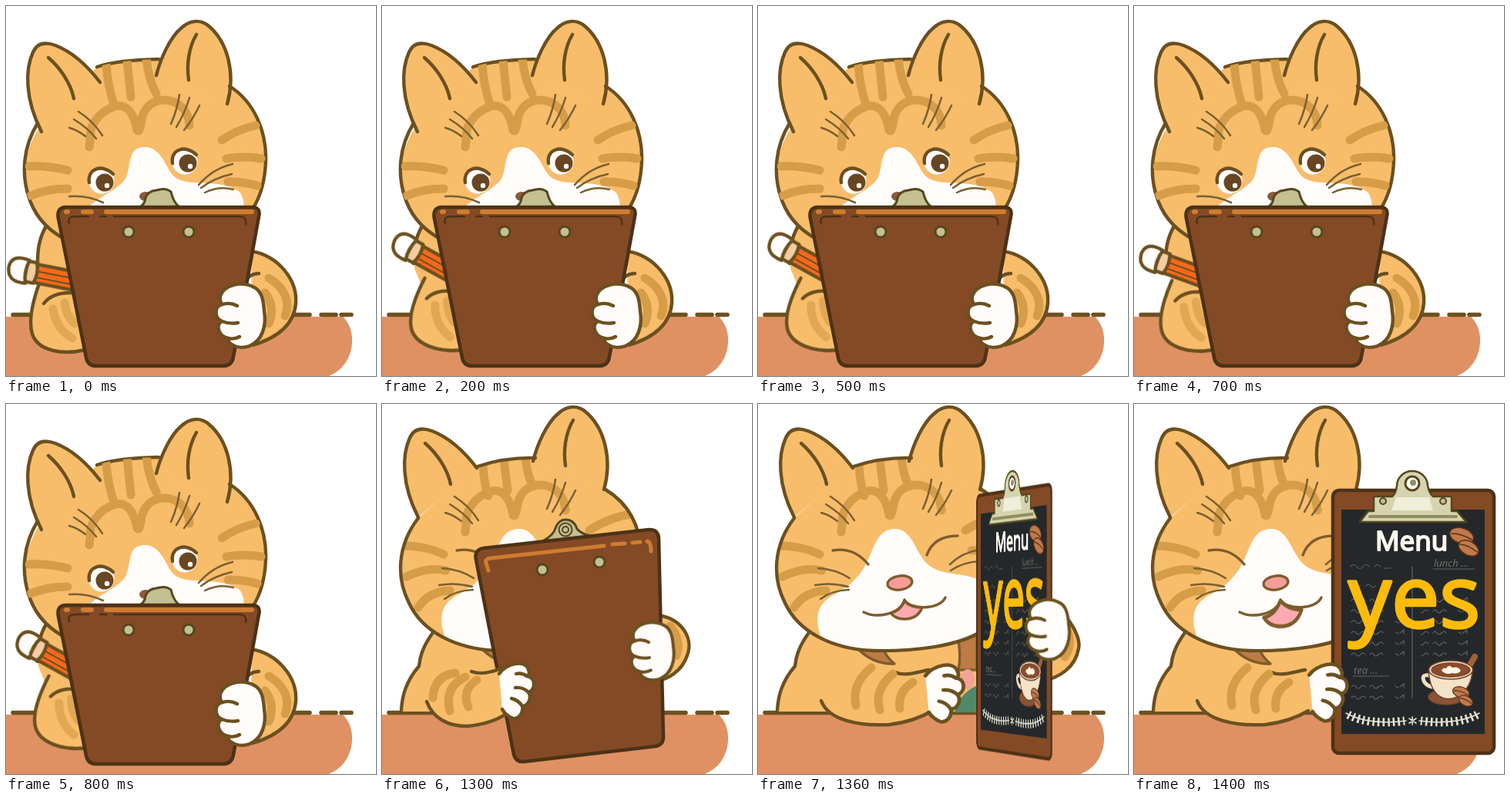
Animation, 480 px wide and 480 px high, one loop 1.42 s. Source, as an HTML page:

```html
<!DOCTYPE html>
<html lang="en">
<head>
<meta charset="utf-8">
<title>Cat with a menu board</title>
<style>
  html, body { margin: 0; width: 100%; height: 100%; overflow: hidden; background: #fff; }
  #stage { position: relative; width: 480px; height: 480px; overflow: hidden; }
  #stage > svg { position: absolute; left: 0; top: 0; width: 480px; height: 480px; }
  svg { fill: none; stroke-linecap: round; stroke-linejoin: round; }

  .ink { stroke: #6b5020; stroke-width: 4.4; }
  .fur { fill: #f8bd6b; }
  .white { fill: #fffcfa; }
  .stripe { stroke: #d69d49; stroke-width: 11; }
  .hair { stroke: #7a6032; stroke-width: 2.5; }
  .face { stroke: #7d5c2c; stroke-width: 3.4; }
  .wood { fill: #844a25; stroke: #4c3216; stroke-width: 4.5; }
  .shine { stroke: #ce7c31; stroke-width: 5; }
  .metal { fill: #c3c092; stroke: #55461f; stroke-width: 3; }
  .bean { fill: #c17a4a; stroke: #55301c; stroke-width: 1.6; }
  .chalk { stroke: #62625d; stroke-width: 1.2; }
  text { font-family: "Open Sans", sans-serif; }

  .t { animation: 1420ms step-end infinite; }
  .write { animation-name: write; }
  .smile { animation-name: smile; }
  .hold { animation-name: hold; }
  .turn { animation-name: turn; }
  .reach { animation-name: reach; }
  .grip { animation-name: grip; }
  .pencil { animation-name: pencil; }
  .forearm { animation-name: forearm; transform-origin: 100px 446px; }
  .back { animation-name: back; }
  .tongue { animation-name: tongue; transform-origin: 190px 258px; }
  .paw { animation-name: paw; }
  #front { animation-name: front; transform-origin: 362px 282px; }

  @keyframes write { 0% { opacity: 1 } 91.54%, 100% { opacity: 0 } }
  @keyframes smile { 0% { opacity: 0 } 91.54%, 100% { opacity: 1 } }
  @keyframes hold { 0%, 92.95%, 100% { opacity: 0 } 91.54% { opacity: 1 } }
  @keyframes turn { 0%, 94.36%, 100% { opacity: 0 } 91.54% { opacity: 1 } }
  @keyframes reach { 0% { opacity: 0 } 92.95%, 100% { opacity: 1 } }
  @keyframes grip { 0%, 98.59%, 100% { opacity: 0 } 92.95% { opacity: 1 } }

  @keyframes pencil {
    0%, 21.12%, 42.25% { transform: translate(18px, 343px) rotate(11deg) }
    7.04%, 28.16%, 49.29% { transform: translate(23px, 328px) rotate(20deg) }
    14.08%, 35.21%, 56.33%, 100% { transform: translate(29px, 312px) rotate(29deg) }
  }
  @keyframes forearm {
    0%, 21.12%, 42.25% { transform: none }
    7.04%, 28.16%, 49.29% { transform: rotate(4deg) }
    14.08%, 35.21%, 56.33%, 100% { transform: rotate(8deg) }
  }
  @keyframes back {
    0% { transform: none }
    92.95%, 100% { transform: translate(184px, 0) scaleX(.5) }
  }
  @keyframes tongue { 0% { transform: none } 98.59%, 100% { transform: scale(1.2, 1.45) } }
  @keyframes paw {
    0% { transform: translate(50px, -8px) scale(1.1, 1.03) }
    98.59%, 100% { transform: translate(60px, -9px) scale(1.1, 1.03) }
  }
  @keyframes front {
    0% { opacity: 0; transform: none }
    94.36% { opacity: 1; transform: translateX(-36px) perspective(2100px) rotateY(-81deg) }
    95.77% { opacity: 1; transform: translateX(-32px) perspective(2100px) rotateY(-62.6deg) }
    97.18% { opacity: 1; transform: translateX(-16px) perspective(2100px) rotateY(-35deg) }
    98.59%, 100% { opacity: 1; transform: none }
  }
</style>
</head>
<body>
<div id="stage">

<!-- table, cat and back of the board -->
<svg viewBox="0 0 480 480">
  <defs>
    <g id="ears" class="fur ink">
      <path d="M46 163C24 120 25 82 35 60C41 46 53 47 64 51C87 60 106 78 122 99"/>
      <path d="M195 90C200 70 212 41 228 28C239 18 253 17 263 26C288 47 298 88 287 127"/>
      <path fill="none" d="M55 67C70 80 84 100 88 120M247 37C237 54 234 76 237 96"/>
    </g>
    <g id="brow">
      <path class="stripe" d="M108 183C111 166 107 162 115 150C122 139 132 133 142 130C157 127 166 139 170 161C173 164 173 160 175 153C177 131 191 121 208 122C226 124 237 137 238 155"/>
      <path class="hair" d="M94 137Q113 149 125 168M88 147Q106 158 117 172M82 158Q93 161 103 169M225 115Q222 135 214 153M238 119Q232 139 221 157M251 129Q243 146 231 161"/>
    </g>
    <g id="pawLeft">
      <path class="white ink" d="M322 365C305 356 283 362 278 376C277 382 279 386 281 387C271 388 269 404 280 409C272 414 275 428 288 431C288 440 303 446 316 441C333 434 338 414 335 396C334 382 332 370 322 365Z"/>
      <path class="ink" d="M281 387Q291 384 300 389M280 409Q290 413 301 411M288 431Q296 433 303 429"/>
    </g>
    <g id="pawRight">
      <path class="white ink" d="M152 350C160 337 186 330 190 345C192 349 190 352 188 353C199 354 200 370 190 374C195 382 189 392 182 392C184 402 176 409 170 408C163 405 159 402 156 396"/>
      <path class="ink" d="M188 353Q181 348 174 350M190 374Q183 367 173 368M182 392Q177 384 168 382"/>
    </g>
    <clipPath id="headUp"><path id="writeShape" d="M45 155L118 79Q145 70 198 69L290 104C323 125 338 164 337 200Q336 238 318 270L75 303C45 288 23 258 24 215Q26 182 45 155Z"/></clipPath>
    <clipPath id="headSmile"><path id="smileShape" d="M47 148C20 183 18 225 35 258C52 295 95 318 150 320C205 321 258 314 288 296C330 280 337 230 336 195C335 155 318 128 290 111L199 71Q160 68 124 80Z"/></clipPath>
  </defs>

  <path fill="#e09163" d="M0 403H437Q450 416 449 437C447 460 435 473 419 480H0Z"/>
  <path class="ink" style="stroke-width:5.5" d="M9 400.500H394M409 400.500H428M435 400.500H448"/>

  <!-- writing pose -->
  <g class="t write">
    <path class="fur" d="M52 280C41 300 41 320 42 340L58 380V430H110V280Z"/>
    <path class="ink" d="M53 284C42 302 41 318 41 334"/>
    <path class="fur ink" d="M318 318C354 324 378 356 376 385C374 414 350 431 320 440"/>
    <path class="stripe" d="M341 353C360 364 370 383 362 402M336 372Q350 390 341 412"/>
    <path class="ink" d="M328 347Q315 347 308 360"/>

    <use href="#writeShape" class="fur"/>
    <use href="#ears"/>
    <path class="ink" d="M118 79Q145 70 198 69M290 104C323 125 338 164 337 200Q336 238 320 263M41 152C22 183 20 217 29 246C36 270 50 287 72 300"/>
    <g clip-path="url(#headUp)">
      <path class="stripe" d="M130 76Q132 104 140 127M157 70L162 118M182 68Q185 96 195 114M30 208Q53 207 80 213M32 246Q53 237 80 237M280 174Q298 161 324 155M286 198Q310 194 331 198M288 228Q310 228 326 233"/>
    </g>
    <use href="#brow"/>
    <path class="white" d="M104 264C121 246 149 237 156 222C163 203 158 183 180 183C203 183 207 212 219 222C236 236 279 222 304 242Q310 252 308 264Z"/>
    <path class="hair" d="M82 247Q105 245 126 255M294 205Q268 211 250 232M293 218Q270 223 253 236M295 238Q276 233 258 242"/>
    <g id="eye">
      <circle class="white" cx="124" cy="227" r="16.500"/>
      <path class="ink" d="M108 229C105 211 125 204 139 218"/>
      <circle cx="128" cy="229" r="11.500" fill="#684621"/>
      <circle cx="131" cy="233" r="3.200" fill="#fff"/>
    </g>
    <use href="#eye" x="108" y="-25"/>
    <ellipse cx="181" cy="247" rx="8" ry="6" fill="#8c5a3b"/>

    <g class="t forearm">
      <path class="fur" d="M44 358C31 394 30 412 34 425C41 448 74 453 103 446V345Z"/>
      <path class="ink" d="M43 360C31 394 30 412 34 425C41 448 74 453 103 446M49 386Q60 371 87 372"/>
      <path class="stripe" opacity=".65" d="M61 393Q65 419 86 431M76 385Q78 402 89 412"/>
    </g>
    <g class="t pencil">
      <path fill="#f86919" class="ink" d="M20-12H85V12H20Z"/>
      <path class="ink" style="stroke-width:2" d="M25-3H80M25 5H80"/>
      <path fill="#f3cda0" class="ink" d="M8-14H20Q25 0 20 13H8Z"/>
      <path class="white ink" d="M10-15Q-14-20-15-2Q-14 18 10 15Q5 0 10-15Z"/>
    </g>

    <path class="metal" d="M172 262Q180 258 181 249Q184 240 195 239Q207 235 214 241Q217 254 224 260Z"/>
    <path class="wood" d="M78 261H319Q331 261 328 273L295 455Q293 467 281 467H117Q106 467 104 456L68 276Q65 261 78 261Z"/>
    <path class="shine" style="stroke-width:6" d="M78 267H80M100 267H111M130 267H319"/>
    <path stroke="#4c3216" stroke-width="2.500" d="M82 282Q79 273 90 273H107M122 273H130M140 273H302Q313 273 311 283"/>
    <circle class="metal" cx="159" cy="293" r="7"/>
    <circle class="metal" cx="237" cy="293" r="7"/>
    <use href="#pawLeft"/>
  </g>

  <!-- smiling pose -->
  <g class="t smile">
    <path class="fur" d="M66 295C50 318 49 333 47 341C30 361 26 380 25 399H286V290Z"/>
    <path class="ink" d="M65 298C50 319 49 333 48 340C30 361 26 380 25 398"/>
    <path fill="#bd7b46" class="face" d="M130 318Q150 338 177 337Q167 329 164 320Z"/>
    <path fill="#bd7b46" class="face" d="M259 303Q264 325 260 345H284V300Z"/>
    <path fill="#50896a" d="M255 400Q260 376 286 364V400Z"/>
    <use href="#smileShape" class="fur"/>
    <use href="#ears" x="1" y="-16"/>
    <g clip-path="url(#headSmile)">
      <path class="stripe" d="M131 78Q132 103 138 119M158 72L163 112M186 70Q188 91 196 107M32 184Q59 185 80 195M32 224Q58 211 83 216M47 264Q61 243 88 242M269 164Q294 147 327 142M277 190H335"/>
      <path class="white" d="M78 272C83 247 112 246 127 226C151 204 147 162 178 162C200 162 204 192 219 207C237 224 265 217 292 230V330H100Q73 300 78 272Z"/>
    </g>
    <use href="#brow" y="-17"/>
    <path class="ink" d="M47 148C20 183 18 225 35 258C52 295 95 318 150 320C205 321 258 314 288 296C330 280 337 230 336 195C335 155 318 128 290 111M124 81Q160 69 199 70"/>
    <path class="hair" d="M78 213Q100 214 119 226M74 235Q95 231 117 237M81 253Q95 242 118 241M249 208Q264 193 287 189M250 216Q266 205 288 204"/>
    <path class="face" d="M97 190Q124 185 143 208M219 196Q228 171 259 171"/>
    <ellipse class="face" cx="184" cy="232" rx="16" ry="9" fill="#f49d98" transform="rotate(-8 184 232)"/>
    <path class="t tongue face" fill="#fbaab0" d="M172 271Q184 269 190 256Q198 264 213 264Q207 279 190 279Q178 279 172 271Z"/>
    <path class="face" d="M137 270C153 278 184 274 190 254C198 268 236 267 243 251"/>

    <g class="t reach">
      <path class="fur" d="M82 385C91 410 130 418 170 416Q203 412 226 398L222 345L150 342Z"/>
      <path class="ink" d="M82 385C91 410 130 418 170 416Q203 412 226 398M178 348C191 354 208 347 222 345"/>
      <path class="stripe" d="M147 342Q121 363 127 391M175 350Q150 371 158 397M201 361Q181 373 184 395"/>
      <ellipse class="t grip" cx="272" cy="357" rx="9" ry="13" fill="#f3a19a"/>
    </g>
    <g class="t hold">
      <path class="fur ink" d="M355 274C387 276 405 303 396 326C389 347 371 357 355 360"/>
      <path class="stripe" d="M374 288Q389 307 382 326"/>
    </g>
    <g class="t grip">
      <path class="fur ink" d="M370 257C397 263 420 300 416 317C411 344 390 354 370 360"/>
      <path class="stripe" d="M397 285Q411 309 398 328"/>
    </g>
    <g class="t turn"><g class="t back">
      <path class="metal" d="M208 178Q223 170 225 161Q229 150 238 150Q249 150 253 162Q258 168 270 171Z"/>
      <circle class="metal" cx="238" cy="163" r="8.500" style="stroke-width:2"/>
      <circle class="metal" cx="238" cy="163" r="4" style="stroke-width:2"/>
      <path class="wood" d="M132 187L346 163Q358 162 359 174L365 432Q365 442 355 444L184 464Q174 465 171 455L122 202Q119 189 132 187Z"/>
      <path class="shine" d="M138 216L135 206Q133 201 141 200L288 184M299 182L315 181M325 180L335 179M344 178Q349 179 349 191"/>
      <circle class="metal" cx="208" cy="215" r="7"/>
      <circle class="metal" cx="282" cy="205" r="7"/>
    </g></g>
    <g class="t hold">
      <path class="fur" d="M58 386C66 408 86 418 110 418Q142 415 161 402L156 343L100 344Z"/>
      <path class="ink" d="M58 386C66 408 86 418 110 418Q142 415 161 402M116 347Q132 353 157 342"/>
      <path class="stripe" d="M95 349Q68 352 66 381M108 354Q80 368 88 398M123 358Q103 371 112 393"/>
      <use href="#pawRight"/>
      <use href="#pawLeft" transform="translate(73 -45) scale(.91)"/>
    </g>
  </g>
</svg>

<!-- front of the board -->
<svg id="front" class="t" viewBox="0 0 480 480">
  <defs>
    <pattern id="rows" width="82" height="14" patternUnits="userSpaceOnUse" x="280" y="246">
      <path class="chalk" d="M2 9q3-4 6 0t6 0t6 0M26 9q3-4 5 0t6 0t6 0M59 8l4 2M65 9l5-4v5"/>
    </pattern>
    <g id="laurel">
      <path stroke="#e5e3d2" stroke-width="1.500" d="M275 401Q304 417 353 411"/>
      <path stroke="#e5e3d2" stroke-width="11" stroke-linecap="butt" stroke-dasharray="2.600 4" d="M278 403Q304 417 351 411"/>
    </g>
  </defs>
  <rect class="wood" x="258" y="112" width="209" height="341" rx="8"/>
  <rect x="269" y="137" width="186" height="291" fill="#24282a"/>
  <path class="chalk" d="M361 211V381M281 211q4-5 8 0t8 0t8 0M312 211q4-5 8 0M324 213H333M281 236q3-4 6 0t6 0M301 236q3-4 6 0t6 0"/>
  <path fill="url(#rows)" d="M280 246H354V330H280ZM280 358H354V386H280ZM372 246H442V330H372Z"/>
  <g fill="#77756e" font-size="13" font-style="italic">
    <text x="389" y="211">lunch ...</text>
    <text x="285" y="350">tea ...</text>
  </g>
  <path class="chalk" d="M388 214H442M284 353H330"/>

  <path class="metal" style="fill:#d5d4af;stroke-width:2.5" d="M293 153L304 139H311V120H335Q340 116 341 106A20 19 0 0 1 381 106Q383 116 388 120H412V139H419L431 153Z"/>
  <path fill="#efeed9" d="M340 121H383L388 138H334Z"/>
  <path stroke="#8f8f63" stroke-width="4" d="M306 146H418"/>
  <circle class="metal" cx="361" cy="103" r="9" style="fill:#fff"/>
  <circle cx="362" cy="102" r="4" fill="#8f8f63"/>
  <circle class="metal" cx="323" cy="126" r="4" style="stroke-width:2"/>
  <circle class="metal" cx="401" cy="126" r="4" style="stroke-width:2"/>

  <g id="beans">
    <ellipse class="bean" cx="425" cy="171" rx="16" ry="10" transform="rotate(18 425 171)"/>
    <path class="bean" fill="none" d="M412 168Q425 168 438 176"/>
    <ellipse class="bean" cx="434" cy="187" rx="14" ry="9" transform="rotate(28 434 187)"/>
    <path class="bean" d="M423 182Q434 183 445 192"/>
  </g>
  <text x="313" y="190" font-size="35" fill="#fffaf0" stroke="#fffaf0" stroke-width="2">Menu</text>

  <g stroke="#74462c" stroke-width="1.500">
    <ellipse cx="405" cy="380" rx="23" ry="10" fill="#8b5435"/>
    <path d="M432 345L442 328" stroke="#a25f34" stroke-width="8"/>
    <path stroke="#f3dfbf" stroke-width="5" d="M384 352Q371 350 377 361Q382 368 392 367"/>
    <path fill="#f5e3c8" d="M382 346Q384 374 400 381Q411 385 421 379Q438 367 439 346Z"/>
    <ellipse cx="411" cy="345" rx="28.500" ry="12" fill="#f5e3c8"/>
    <ellipse cx="411" cy="345" rx="25" ry="9" fill="#8b4c2c"/>
    <path fill="#fff6e6" stroke="none" d="M399 346q2-5 6-3q3-6 8-1q8-2 11 4q-4 5-11 3q-8 3-14-3Z"/>
  </g>
  <use href="#beans" transform="translate(131 256) scale(.69)"/>
  <use href="#laurel"/>
  <use href="#laurel" transform="translate(723 0) scale(-1 1)"/>
  <path stroke="#e5e3d2" stroke-width="1.600" d="M361 406V416M357 408L366 414M366 408L357 414"/>
  <text x="278" y="290" font-size="111" fill="#fdbb0b" stroke="#fdbb0b" stroke-width="3.500">yes</text>
</svg>

<!-- paws over the board -->
<svg viewBox="0 0 480 480">
  <use class="t grip" href="#pawLeft" transform="translate(105 -87) scale(.89 .945)"/>
  <g class="t reach"><g class="t paw"><use href="#pawRight"/></g></g>
</svg>

</div>
</body>
</html>
```
